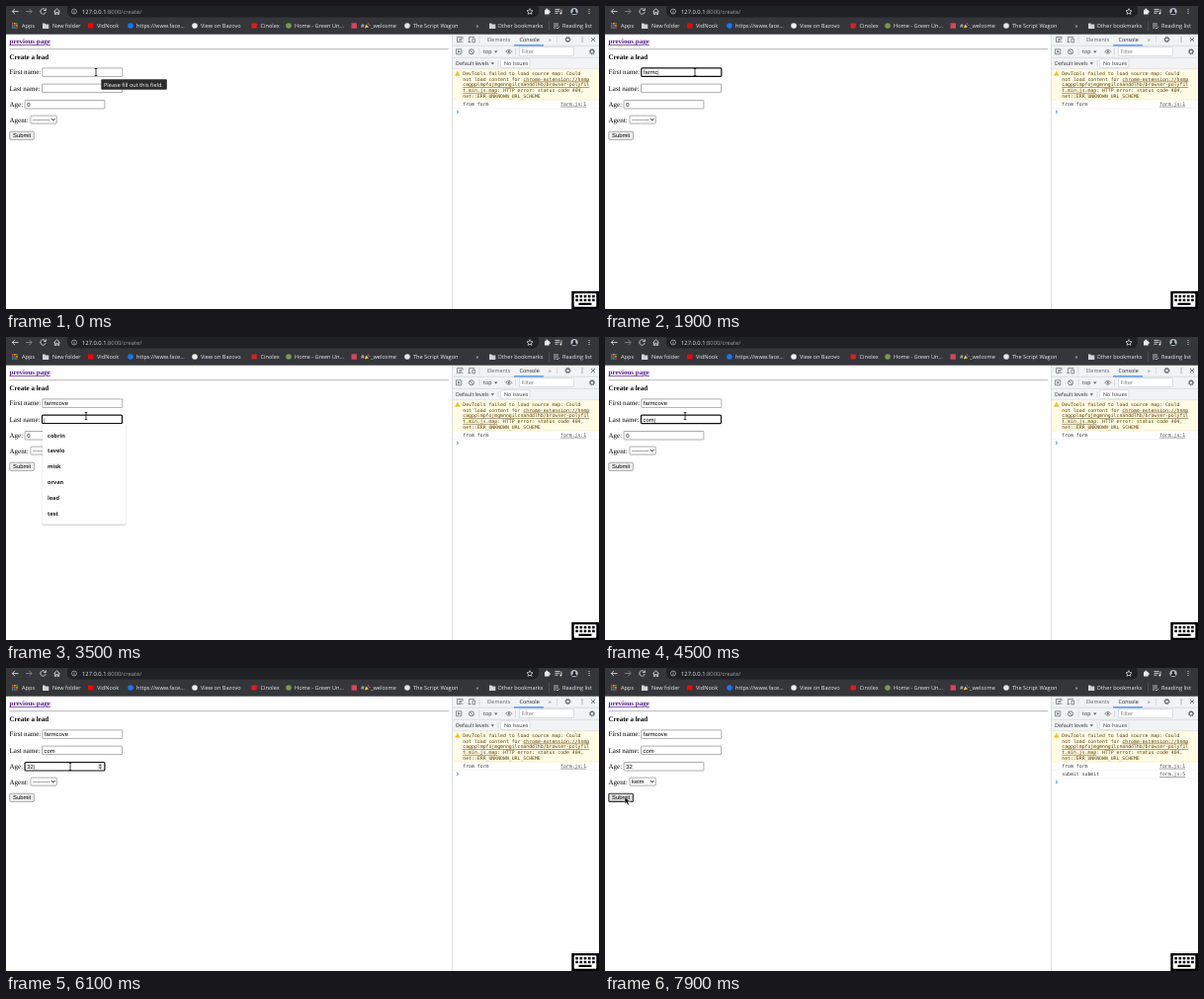
An HTML page that plays this animation: 600 px wide and 307 px high, repeating every 8 s.

```html
<!DOCTYPE html>
<html lang="en">
<head>
<meta charset="utf-8">
<title>Create a lead</title>
<style>
html, body { margin: 0; height: 100%; overflow: hidden; background: #fff; }
svg { display: block; width: 100vw; height: 100vh; }
text { white-space: pre; text-rendering: geometricPrecision; }
.ui { font: 5.6px "Open Sans", "Noto Sans", sans-serif; }
.page { font: 7.03px "Liberation Serif", "Times New Roman", serif; }
.field { font: 5.86px "Liberation Sans", Arial, sans-serif; }
.dev { font: 5.4px "Open Sans", "Noto Sans", sans-serif; }
.mono { font: 4.83px "DejaVu Sans Mono", monospace; }
.b { font-weight: bold; }
.u { text-decoration: underline; text-decoration-thickness: .45px; }
</style>
</head>
<body>
<svg viewBox="0 0 600 307" preserveAspectRatio="none"><g id="base"></g><g id="live"></g></svg>
<script>
const rect = (x, y, w, h, fill, extra = '') =>
  `<rect x="${x}" y="${y}" width="${w}" height="${h}" fill="${fill}" ${extra}/>`;
const dot = (x, y, r, fill, extra = '') =>
  `<circle cx="${x}" cy="${y}" r="${r}" fill="${fill}" ${extra}/>`;
const line = (d, stroke, width = 0.8, fill = 'none') =>
  `<path d="${d}" stroke="${stroke}" stroke-width="${width}" fill="${fill}"/>`;
const text = (x, y, s, cls, fill = '#000') =>
  `<text x="${x}" y="${y}" class="${cls}" fill="${fill}">${s}</text>`;
const dots = (x, y, fill) => [-2, 0, 2].map(d => dot(x, y + d, 0.6, fill)).join('');
const gear = (x, y) => dot(x, y, 1.9, 'none', 'stroke="#5f6368" stroke-width="1.1"') +
  dot(x, y, 2.6, 'none', 'stroke="#5f6368" stroke-width=".9" stroke-dasharray="1 1.04"');
const folder = x => line(`M${x} 17.6h2.3l.8 .9h3.2v4.4h-6.3z`, 'none', 0, '#d0d2d5');

function browserBar() {
  const ink = '#e8eaed';
  const marks = [
    [92, 'VidNook', '#f00', 0], [132, 'https://www.face...', '#1877f2', 1],
    [197, 'View on Bazovo', '#eee', 1], [257.5, 'Cinolex', '#d81f26', 0],
    [292, 'Home - Green Un...', '#7c9a4c', 1], [412, 'The Script Wagon', '#e4e4e4', 1]];
  let s = rect(0, 0, 600, 28.7, '#35363a') + rect(62, -3, 477, 14.5, '#202124', 'rx="6"');
  s += line('M12.5 5.5h-6M9 2.8l-2.7 2.7l2.7 2.7', ink);
  s += line('M20 5.5h6M23.5 2.8l2.7 2.7l-2.7 2.7', '#8b8d90');
  s += line('M39.7 3.8a2.7 2.7 0 1 0 .5 2.3M40.4 2.3v2.2h-2.2', ink);
  s += line('M48.5 5.6l3-2.8l3 2.8M49.4 5.2v3.2h1.4v-2h1.4v2h1.4v-3.2', ink);
  s += dot(69, 5.5, 2.5, 'none', 'stroke="#bdc1c6" stroke-width=".7"') + line('M69 5.2v1.8M69 3.8v.7', '#bdc1c6', 0.7);
  s += `<text x="77" y="7.6" class="ui" style="font-size:5.8px" fill="#e8eaed">127.0.0.1<tspan fill="#9aa0a6">:8000/create/</tspan></text>`;
  s += line('M530 2.6l.9 2l2.1.2l-1.6 1.4l.5 2.1l-1.9-1.1l-1.9 1.1l.5-2.1l-1.6-1.4l2.1-.2z', ink, 0.7);
  s += rect(545, 3.8, 4.6, 4.6, ink, 'rx=".5"') + dot(547.3, 3.6, 1, ink) + dot(549.8, 6.1, 1, ink);
  s += line('M555.5 3.4h5M555.5 5.3h5M555.5 7.2h3M562 3.5v4', ink) + dot(561.3, 7.5, 0.9, ink);
  s += dot(575, 5.5, 3.6, '#b9bec8') + dot(575, 4.7, 1.4, '#1d2027') +
    line('M572.3 8c.5-3 4.9-3 5.4 0z', 'none', 0, '#1d2027') + dots(590, 5.5, ink);
  for (let i = 0; i < 9; i++)
    s += rect(6 + i % 3 * 2.1, 17 + (i / 3 | 0) * 2.1, 1.5, 1.5, ['#ea4335', '#fbbc04', '#34a853', '#4285f4'][i % 4]);
  s += text(16, 22, 'Apps', 'ui', ink) + folder(37) + text(47, 22, 'New folder', 'ui', ink);
  for (const [x, label, fill, round] of marks)
    s += (round ? dot(x - 6, 20, 2.8, fill) : rect(x - 9, 17.4, 5.4, 5, fill, 'rx=".8"')) + text(x, 22, label, 'ui', ink);
  s += rect(349.5, 17.3, 5.4, 5.4, '#d9435e') + text(359, 22, '#', 'ui', ink) +
    line('M363 22.5l1.3-4l2.7 2.7z', 'none', 0, '#f4c542') + dot(366.5, 18, 0.7, '#e2578a') + dot(368, 19.5, 0.6, '#55a9e8') +
    text(369, 22, '_welcome', 'ui', ink);
  s += text(475.5, 22, '»', 'ui', ink) + folder(489) + text(497.5, 22, 'Other bookmarks', 'ui', ink);
  s += line('M549.5 15v10', '#5f6368', 0.5) + line('M554 18h5M554 20h5M554 22h2.5M557 22l1 1l2-2.2', ink, 0.7);
  return s + text(563, 22, 'Reading list', 'ui', ink);
}

function devTools() {
  const grey = '#5f6368', edge = '#cacdd1', warn = '#5c3c00';
  let s = rect(451.5, 28, 148.5, 279, '#fff') + rect(451.5, 28, 148.5, 36, '#f1f3f4');
  s += line('M451.5 28v279M451.5 40.2H600M451.5 52.3H600M451.5 64H600', edge, 0.6);
  s += line('M479 31v6.5M557.5 31v6.5M479 43v6.5M515.5 43v6.5M498 55v6.5', edge, 0.6);
  s += line('M460.5 36.5h-4v-5h5.5v2M459 33.5l3.5 3.5M459 36v-2.6h2.6', grey, 0.7);
  s += line('M468.5 36.6v-5h5.5M467.5 36.6h3M472 33.2h2.6v3.7h-2.6z', grey, 0.7);
  s += text(487, 36, 'Elements', 'dev', grey) + text(519.5, 36, 'Console', 'dev', '#222') +
    rect(514, 39.4, 30, 1, '#1a73e8') + text(549, 36, '»', 'dev', grey);
  s += gear(568.5, 34) + dots(583, 34, grey) + line('M592 32l4 4M596 32l-4 4', grey);
  s += line('M455.5 43.8h5.2v5h-5.2z', grey, 0.7) + line('M457.3 44.8l2.3 1.5l-2.3 1.5z', 'none', 0, grey);
  s += dot(471, 46.3, 2.5, 'none', `stroke="${grey}" stroke-width=".8"`) + line('M469.3 44.6l3.4 3.4', grey);
  s += text(483, 48.1, 'top', 'dev', '#333') + line('M494 45.5h3.4l-1.7 2.2z', 'none', 0, grey);
  s += line('M505.8 46.3q3-4 6 0q-3 4-6 0z', grey, 0.7) + dot(508.8, 46.3, 1, grey);
  s += rect(519.5, 41.8, 55, 8.8, '#fff', `stroke="${edge}" stroke-width=".6"`) + text(521.5, 48.1, 'Filter', 'dev', '#757575') + gear(593, 46.3);
  s += text(455, 60, 'Default levels', 'dev', '#333') + line('M490.6 57.2h3.4l-1.7 2.2z', 'none', 0, grey);
  s += rect(500.5, 53.8, 29.5, 8.6, '#fff', `rx="1" stroke="${edge}" stroke-width=".6"`) + text(504, 60, 'No Issues', 'dev', '#333');
  s += rect(452, 64.2, 148, 30.8, '#fffbe5') + line('M452 95H600', '#f6e7a8', 0.5);
  s += line('M456.8 65.8l2.6 4.6h-5.2z', 'none', 0, '#f0b400') + line('M456.8 67.2v1.6M456.8 69.3v.5', '#fff', 0.5);
  [['DevTools failed to load source map: Could', ''], ['not load content for ', 'chrome-extension://hnmp'],
   ['', 'cagpplmpfojmgmnngilcnanddlhb/browser-polyfil'], ['', 't.min.js.map', ': HTTP error: status code 404,'],
   ['net::ERR_UNKNOWN_URL_SCHEME', '']].forEach(([a, link, b = ''], i) => {
    s += text(462.3, 70 + i * 5.65, `${a}<tspan class="u">${link}</tspan>${b}`, 'mono', warn);
  });
  return s + logLine(100.8, 'from form', 1);
}

const logLine = (y, msg, row) => text(462.3, y, msg, 'mono', '#303030') +
  text(561, y, 'form.js:' + row, 'mono u', '#444') + line(`M452 ${y + 2.9}H600`, '#ececec', 0.5);

function keyboard() {
  let s = rect(572.3, 289, 27.7, 18, '#000') + rect(574.7, 291.3, 22.6, 13.4, '#fff', 'rx=".8"');
  for (let r = 0; r < 2; r++)
    for (let i = 0; i < 5; i++) s += rect(576.3 + i * 4.2, 293 + r * 3.8, 2.6, 2.4, '#000');
  return s + rect(579.5, 300.8, 13, 2.2, '#000');
}

function page() {
  return text(3.5, 38, 'previous page', 'page b u', '#551a8b') +
    rect(3.5, 43.2, 444.5, 0.5, '#808080') + rect(3.5, 43.7, 444.5, 0.5, '#c8c8c8') +
    text(3.5, 54, 'Create a lead', 'page b') + text(3.5, 69.2, 'First name:', 'page') +
    text(3.5, 85.6, 'Last name:', 'page') + text(3.5, 101.8, 'Age:', 'page') + text(3.5, 117.5, 'Agent:', 'page');
}

// The last entry whose time has come.
const at = (list, t) => list.filter(e => e[0] <= t).pop();

const first = [[0, ''], [200, '|'], [800, 'f|'], [900, 'fa|'], [1100, 'far|'], [1300, 'farm|'], [1900, 'farmc|'],
  [2100, 'farmco|'], [2200, 'farmcov|'], [2400, 'farmcove']];
const last = [[0, ''], [3300, '|'], [4100, 'c|'], [4200, 'co|'], [4500, 'com|'], [5200, 'com']];
const age = [[0, '0'], [5200, '0|'], [5800, '|'], [5900, '3|'], [6100, '32|'], [6600, '32']];
const focus = [[0, ''], [200, 'first'], [3300, 'last'], [5200, 'age'], [6600, 'agent'], [7700, 'submit']];
const names = ['favona', 'fintor', 'melu', 'dorvan', 'kelm', 'test'];
const surnames = ['cobrin', 'tavelo', 'misk', 'orvan', 'lead', 'test'];
const popups = [[0, 0, []], [200, 72, names], [800, 72, names.slice(0, 2)], [900, 72, names.slice(0, 1)], [1200, 0, []],
  [3500, 88, surnames], [4100, 88, surnames.slice(0, 1)], [4300, 0, []]];
const mouse = [[0, 91, 67, 1], [3000, 86, 73.5], [3100, 83, 78, 1], [3200, 81, 80, 1], [4900, 79, 84, 1], [5000, 74, 90],
  [5100, 67, 98, 1], [5200, 65, 100, 1], [6300, 60, 103, 1], [6400, 50, 107], [6500, 41, 112], [6600, 37, 114],
  [6700, 36, 116], [6800, 35, 118.5], [6900, 34, 120.5], [7000, 33, 126], [7100, 33, 129], [7300, 33, 130],
  [7400, 25, 131], [7500, 20, 130.5]];

function input(x, y, w, value, on) {
  const caret = value.endsWith('|');
  const ring = on ? 'stroke="#101010" stroke-width="1.2" rx="1"' : 'stroke="#767676" stroke-width=".6" rx=".5"';
  const shown = caret ? value.slice(0, -1) + '<tspan dx="-.3" font-size="5.2">|</tspan>' : value;
  return rect(x, y, w, 8.5, '#fff', ring) + text(x + 2.1, y + 6.5, shown, 'field');
}

function popup([, y, rows]) {
  if (!rows.length) return '';
  const h = rows.length * 15.8 + 7;
  return rect(36.6, y + 0.7, 84.8, h + 0.6, '#000', 'opacity=".16" rx="1.6"') + rect(37, y, 84, h, '#fff', 'rx="1.5"') +
    rows.map((n, i) => text(42, y + 13.5 + i * 15.8, n, 'ui b', '#202124')).join('');
}

function agent(t, focused) {
  const chosen = t >= 7300, on = focused && chosen;
  let s = rect(24.9, 111.1, 26.4, 8, '#fff', `rx="1" stroke="${on ? '#101010' : '#767676'}" stroke-width="${on ? 1 : 0.6}"`);
  s += text(27, 117.2, chosen ? 'kelm' : '---------', 'field') + line('M46.2 114.2l1.6 1.7l1.6-1.7', '#111', 1);
  if (t < 6700 || chosen) return s;
  const second = t >= 7000;
  return s + rect(24.7, 119.5, 26.8, 15.6, '#fff', 'style="filter:drop-shadow(.6px 1.2px 1.3px #0007)"') +
    rect(24.9, second ? 127.4 : 119.7, 26.4, 7.6, '#1e90ff') +
    text(27, 125.6, '---------', 'field', second ? '#000' : '#fff') + text(27, 133.2, 'kelm', 'field', second ? '#fff' : '#000');
}

function submit(t, on) {
  return rect(3.8, 127.2, 24.6, 8.2, t >= 7500 ? '#e2e2e2' : '#efefef',
    `rx="1" stroke="${on ? '#333' : '#767676'}" stroke-width="${on ? 1.1 : 0.6}"`) + text(7, 133.4, 'Submit', 'field');
}

function pointer([, x, y, beam]) {
  return beam
    ? line(`M${x - 1.3} ${y - 3.5}h2.6M${x} ${y - 3.5}v7M${x - 1.3} ${y + 3.5}h2.6`, '#111', 0.8)
    : line(`M${x} ${y}v7.2l1.7-1.5l1.3 2.8l1.4-.7l-1.3-2.7h2.2z`, '#fff', 0.5, '#111');
}

function scene(t) {
  const on = at(focus, t)[1];
  let s = input(36.8, 62.9, 81, at(first, t)[1], on === 'first') + input(36.5, 79.1, 81, at(last, t)[1], on === 'last') +
    input(19.1, 95.5, 80.8, at(age, t)[1], on === 'age');
  if (t >= 5100 && t < 6500)
    s += rect(92.8, 96.6, 5, 6.4, '#efefef') + line('M93.7 99.2h3.2l-1.6-1.9zM93.7 100.6h3.2l-1.6 1.9z', 'none', 0, '#444');
  s += submit(t, on === 'submit') + agent(t, on === 'agent') + popup(at(popups, t));
  if (t < 200)
    s += rect(96.3, 74.3, 66.5, 10.5, '#2c2c2c', 'rx="1"') + text(99, 81.5, 'Please fill out this field.', 'ui', '#fff');
  const sent = t >= 7900, y = sent ? 115.5 : 107.3;
  if (sent) s += logLine(109.2, 'submit submit', 5);
  return s + line(`M456 ${y - 1.5}l1.6 1.5l-1.6 1.5`, '#1a73e8', 0.9) + pointer(at(mouse, t));
}

base.innerHTML = page() + devTools() + browserBar() + keyboard();
let shown = -1;
function tick() {
  const t = Math.floor(performance.now() % 8000 / 100) * 100;
  if (t !== shown) live.innerHTML = scene(shown = t);
  requestAnimationFrame(tick);
}
tick();
</script>
</body>
</html>
```
